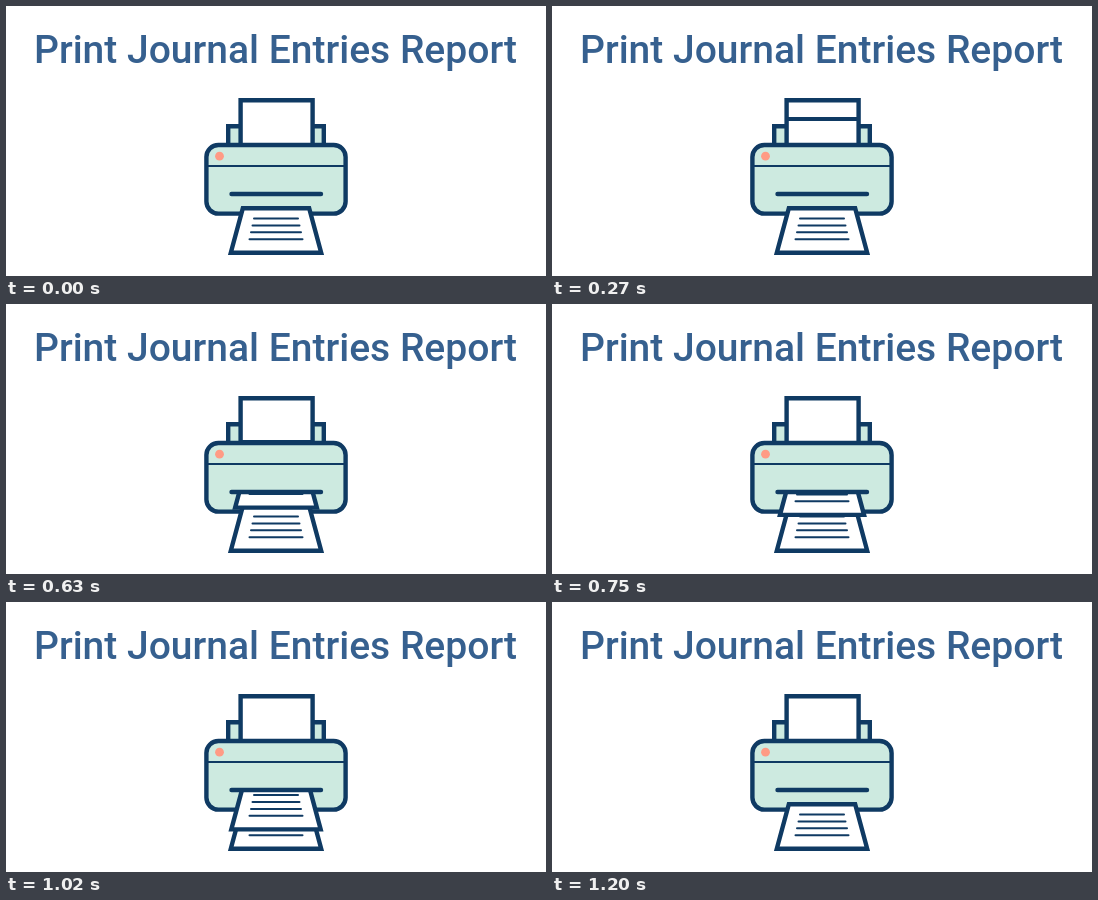
An HTML page with a canvas that plays this animation: 540 px wide and 270 px high, repeating every 1.65 s.

```html
<!DOCTYPE html>
<html lang="en">
<head>
<meta charset="utf-8">
<title>Print Journal Entries Report</title>
<style>
  html, body { margin: 0; width: 100%; height: 100%; overflow: hidden; background: #fff; }
  canvas { display: block; width: 540px; height: 270px; }
</style>
</head>
<body>
<canvas id="stage" width="540" height="270"></canvas>
<script>
const ctx = document.getElementById('stage').getContext('2d');
const NAVY = '#0f3a63', MINT = '#cdeae0', CORAL = '#ff9b85', TITLE = '#36608f';
const LOOP = 1650, STEP = 30, PRINT_END = 1200;
const CENTER = 270, REST_BOTTOM = 249, SLOT_Y = 188;
const STROKE = 4.4;

function line(x1, y1, x2, y2, width, cap = 'butt') {
  ctx.beginPath();
  ctx.moveTo(x1, y1);
  ctx.lineTo(x2, y2);
  ctx.lineWidth = width;
  ctx.lineCap = cap;
  ctx.stroke();
}

function box(x, y, w, h, fill, radius = 0) {
  ctx.beginPath();
  if (radius) ctx.roundRect(x, y, w, h, radius);
  else ctx.rect(x, y, w, h);
  ctx.fillStyle = fill;
  ctx.fill();
  ctx.lineWidth = STROKE;
  ctx.stroke();
}

// A printed sheet, placed by its outer bottom edge; it fans out as it leaves.
function sheet(bottom) {
  const low = bottom - 2.2, high = bottom - 46.8;
  const half = Math.min(45.2, 40.1 + (bottom - 201) * 0.16);
  const topHalf = half - (low - high) * 0.27;
  ctx.beginPath();
  ctx.moveTo(CENTER - topHalf, high);
  ctx.lineTo(CENTER + topHalf, high);
  ctx.lineTo(CENTER + half, low);
  ctx.lineTo(CENTER - half, low);
  ctx.closePath();
  ctx.fillStyle = '#fff';
  ctx.fill();
  ctx.lineWidth = STROKE;
  ctx.stroke();
  for (let i = 0; i < 4; i++) {
    const reach = 22 + i * 1.5, y = bottom - 36.5 + i * 6.9;
    line(CENTER - reach, y, CENTER + reach, y, 2, 'round');
  }
}

function sheetBottom(t) {
  return t <= 1080
    ? 200.3 + (t - 540) / STEP * 1.83
    : 233.3 + (t - 1080) / (PRINT_END - 1080) * (REST_BOTTOM - 233.3);
}

function draw(t) {
  const printing = t > 0 && t < PRINT_END;
  ctx.fillStyle = '#fff';
  ctx.fillRect(0, 0, 540, 270);

  ctx.fillStyle = TITLE;
  ctx.font = '500 39px Roboto, sans-serif';
  ctx.textAlign = 'center';
  ctx.fillText('Print Journal Entries Report', 269.5, 57);

  ctx.strokeStyle = NAVY;
  box(222.2, 120.2, 95.6, 26, MINT);
  box(234.6, 94.2, 72, 50, '#fff');
  if (printing) {
    const y = Math.min(140, 94.2 + t / STEP * 2.08);
    line(234, y, 307, y, 4);
  }

  box(200.4, 139, 139.2, 68.6, MINT, 12);
  line(201, 160, 339, 160, 2);
  ctx.beginPath();
  ctx.arc(213.5, 150.2, 4.4, 0, Math.PI * 2);
  ctx.fillStyle = CORAL;
  ctx.fill();

  sheet(REST_BOTTOM);
  if (printing) {
    ctx.save();
    ctx.beginPath();
    ctx.rect(0, SLOT_Y, 540, 270 - SLOT_Y);
    ctx.clip();
    sheet(sheetBottom(t));
    ctx.restore();
  }
  line(225.5, SLOT_Y, 315, SLOT_Y, STROKE, 'round');
}

function tick() {
  const t = performance.now() % LOOP;
  draw(Math.floor(t / STEP) * STEP);
  requestAnimationFrame(tick);
}
tick();
</script>
</body>
</html>
```
